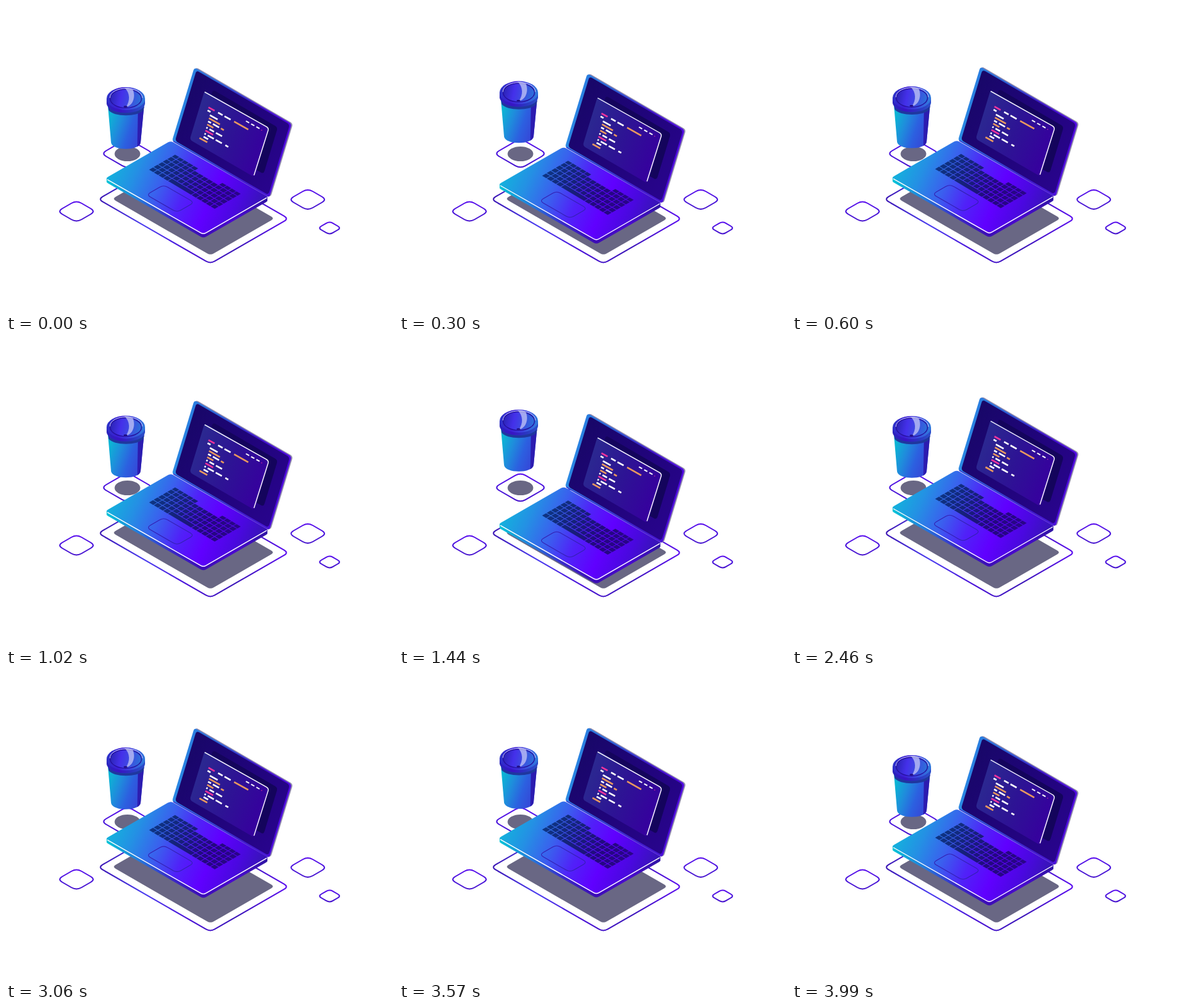
An HTML page for the animation above (4560 ms loop, 604x479 px).

```html
<!DOCTYPE html>
<html lang="en">
<head>
<meta charset="utf-8">
<title>Floating laptop and cup</title>
<style>
html, body { margin: 0; width: 100%; height: 100%; overflow: hidden; background: #fff; }
svg { display: block; }
</style>
</head>
<body>
<svg id="stage" width="604" height="479" viewBox="0 0 604 479" fill="none"></svg>
<script>
const defs = [];

// Linear gradient in user space; returns a paint reference.
function grad(x1, y1, x2, y2, ...colors) {
  const id = 'g' + defs.length;
  const stops = colors.map((c, i) =>
    `<stop offset="${i / (colors.length - 1)}" stop-color="${c}"/>`).join('');
  defs.push(`<linearGradient id="${id}" gradientUnits="userSpaceOnUse" x1="${x1}" y1="${y1}" x2="${x2}" y2="${y2}">${stops}</linearGradient>`);
  return `url(#${id})`;
}

const path = (d, attrs) => `<path d="${d}" ${attrs}/>`;
const fill = c => `fill="${c}"`;
const line = (c, w) => `stroke="${c}" stroke-width="${w}"`;
const ellipse = (x, y, rx, ry, attrs) =>
  `<ellipse cx="${x}" cy="${y}" rx="${rx}" ry="${ry}" ${attrs}/>`;
const shift = (x, y, inner) => `<g transform="translate(${x} ${y})">${inner}</g>`;

// Closed polygon whose corners are rounded over a distance r.
function poly(points, r, attrs) {
  const n = points.length;
  const toward = ([x, y], [u, v]) => {
    const k = r / Math.hypot(u - x, v - y);
    return `${x + (u - x) * k} ${y + (v - y) * k}`;
  };
  const d = points.map((p, i) =>
    `${i ? 'L' : 'M'}${toward(p, points[(i + n - 1) % n])}Q${p} ${toward(p, points[(i + 1) % n])}`);
  return path(d.join('') + 'Z', attrs);
}

// Rectangle (u0,v0)-(u1,v1) on a plane with origin o and axes u, v.
const plane = (o, u, v) => (u0, v0, u1, v1) =>
  [[u0, v0], [u1, v0], [u1, v1], [u0, v1]].map(([a, b]) =>
    [0, 1].map(k => o[k] + a * u[k] + b * v[k]));

// Isometric floor rectangle around a centre.
const flat = (x, y, w, h = w) =>
  plane([x, y], [.866, .5], [-.866, .5])(-w / 2, -h / 2, w / 2, h / 2);

function tile(x, y, size, r) {
  const paint = grad(x, y - size / 2, x, y + size / 2, '#5a0af0', '#4812dc', '#4612cc');
  return poly(flat(x, y, size), r, line(paint, 2));
}

function floor() {
  const shade = fill('#696784');
  const edge = grad(147, 303, 438, 340, '#3a14b4', '#4a3cf0', '#4a10d8', '#3a14b8', '#5a0af0');
  return tile(110, 321.5, 34.5, 9) + tile(471, 303, 34.5, 9) +
    tile(505, 347.5, 20.8, 6) + tile(189.5, 231, 47.2, 9) +
    poly(flat(292.5, 317.7, 202, 141), 8, line(edge, 2)) +
    poly(flat(292.5, 317.2, 177, 115.5), 6, shade) +
    ellipse(189.5, 231.5, 20, 11.5, shade);
}

function cup() {
  const body = grad(160, 178, 212, 196, '#0cb4d4', '#1f8cdc', '#2c60e0', '#3548d8');
  const side = grad(157, 0, 217, 0, '#2a24bc', '#3814c4', '#2a34c0', '#2c50cc');
  const rim = grad(157, 140, 217, 150, '#2c34c8', '#3c1cd4', '#3a44dc', '#2f80dc');
  const well = grad(163, 140, 212, 150, '#2a24b4', '#4430ea', '#3c50e0', '#2a74d8');
  return path('M159 156L164 214C166 227 208 227 210 214L215.5 156Z', fill(body)) +
    path('M206 160L205 220Q209 218 210 214L215.5 156Z', fill('#2c1cb0')) +
    path('M159.5 158L160.2 163C168 174 206 174 214.8 163L215.5 158Z', fill('#1f379f')) +
    path('M157 145V153C160 172 214 172 217 153V145Z', fill(side)) +
    ellipse(187, 145, 30, 18, fill(rim)) +
    ellipse(187, 145, 24.5, 14.5, `${fill(well)} ${line('#24109c', 1.3)}`) +
    path('M162 144C163 124 212 124 213 144', line('#c9c8ff', 1)) +
    path('M185 128Q193 127.5 198 131C202 140 200 155 187 158.5C194 149 194 136 185 128Z', 'fill="#c5c8f6" opacity=".75"') +
    ellipse(186.5, 157.5, 3, 1.2, fill('#200a80'));
}

function keyboard() {
  let d = '';
  const key = (x, y, w = 1, h = 1) => {
    d += `M${x + .06} ${y + .07}h${w - .12}v${h - .14}h${.12 - w}Z`;
  };
  for (let x = 0; x < 14; x++) {
    if (x < 5 || x > 9) key(x, .15, 1, .85);
    for (let y = 1; y < 5; y++) key(x, y);
    if (x < 4 || x > 8) key(x, 5);
  }
  key(4, 5, 5);
  const paint = grad(0, 6, 14, 0, '#0d3684', '#15227a', '#230880', '#2a048a');
  return `<g transform="matrix(7.38 4.42 -7.1 4.12 265 231.5)">${path(d, fill(paint))}</g>`;
}

function base() {
  const top = grad(165, 245, 390, 345, '#12b4dc', '#2490e4', '#3a60ee', '#5022f8', '#6000ff', '#4a08e0', '#3416b0');
  const side = grad(158, 0, 407, 0, '#08c4d8', '#2478dc', '#3a28c8', '#3c0cb4', '#4a08d0', '#3014a4');
  const slab = paint => poly(flat(282.5, 284.7, 177, 118), 5, fill(paint));
  let out = '';
  for (let y = 5; y > 0; y--) out += shift(0, y, slab(side));
  return out + slab(top) +
    path('M158 271.5L304 355Q308 357.5 312 355L407 300', line('#fff', 1.4)) +
    keyboard() +
    poly(flat(256.5, 301.5, 55, 31), 7, line('#3420b4', 1.1));
}

// Each letter is an ink; a run of letters becomes one dash.
const inks = { p: '#ee329c', w: '#fff', o: '#e9985e' };
const code = [
  'pppp  www wwww  ooooooooo',
  'ww',
  '  wwwww',
  '  ooooooo',
  '  ww wwww oo',
  '  oooo',
  '  w www wwww',
  '  ppppp',
  '  w wwww wwww  ww',
  '  www',
  'ooooo'
];

function text(rows, x, y, size, thick) {
  let out = '';
  rows.forEach((row, i) => {
    for (const run of row.matchAll(/(\w)\1*/g)) {
      const a = run.index * size, w = run[0].length * size - .4;
      out += path(`M${x - 1.4 * i + a} ${y + 4.8 * i + a * .56}l${w} ${w * .56}`, line(inks[run[1]], thick));
    }
  });
  return out;
}

function lid() {
  const frame = grad(260, 190, 445, 220, '#2a8ce4', '#2b60d8', '#4014cc', '#5208e4');
  const screen = grad(270, 140, 430, 260, '#180768', '#20047a', '#28048c');
  const pane = grad(290, 170, 405, 220, '#2b2a90', '#2d1494', '#36009e');
  const rect = plane([294, 96], [152, 88.5], [-35, 115.5]);
  const panel = (u0, v0, u1, v1, paint) => poly(rect(u0, v0, u1, v1), 5, fill(paint));
  return shift(2, -.5, panel(0, 0, 1, 1, '#918bae')) +
    panel(0, 0, 1, 1, frame) +
    panel(.026, .02, .985, .975, screen) +
    path('M261 211.5L410 297.5', line('#4324cc', 1.1)) +
    panel(.221, .133, .887, .766, '#14045c') +
    panel(.151, .2, .815, .864, pane) +
    path('M310 134.5L406 188.5Q410.5 191 409 195L387 265', line('#fff', 1.4)) +
    text(code, 316, 158.5, 2.5, 2.6) +
    text(['ww ww ww'], 374.5, 180, 2.7, 1.9) +
    text(['p'], 398.5, 194, 1.4, 1.4);
}

const scene = `${floor()}<g id="cup">${cup()}</g><g id="laptop">${base()}${lid()}</g>`;
document.getElementById('stage').innerHTML = `<defs>${defs.join('')}</defs>${scene}`;

// Vertical drift as [ms, px] keys, joined by straight lines; the end is held.
const tracks = {
  laptop: [[0, 0], [287, 10], [575, 0], [820, -10], [1070, 0], [1470, 20],
    [2240, 0], [2535, -10], [2670, 0], [3330, -20], [3990, 0]],
  cup: [[0, 0], [320, -10], [640, 0], [1935, -29.3], [2660, 0], [3330, -20], [3990, 0]]
};
const period = 4560;

function valueAt(keys, t) {
  const i = keys.findIndex(k => k[0] > t);
  if (i < 0) return keys[keys.length - 1][1];
  const [t0, a] = keys[i - 1], [t1, b] = keys[i];
  return a + (b - a) * (t - t0) / (t1 - t0);
}

const start = performance.now();
function draw() {
  const t = (performance.now() - start) % period;
  for (const id in tracks) {
    document.getElementById(id).setAttribute('transform', `translate(0 ${valueAt(tracks[id], t)})`);
  }
  requestAnimationFrame(draw);
}
draw();
</script>
</body>
</html>
```
